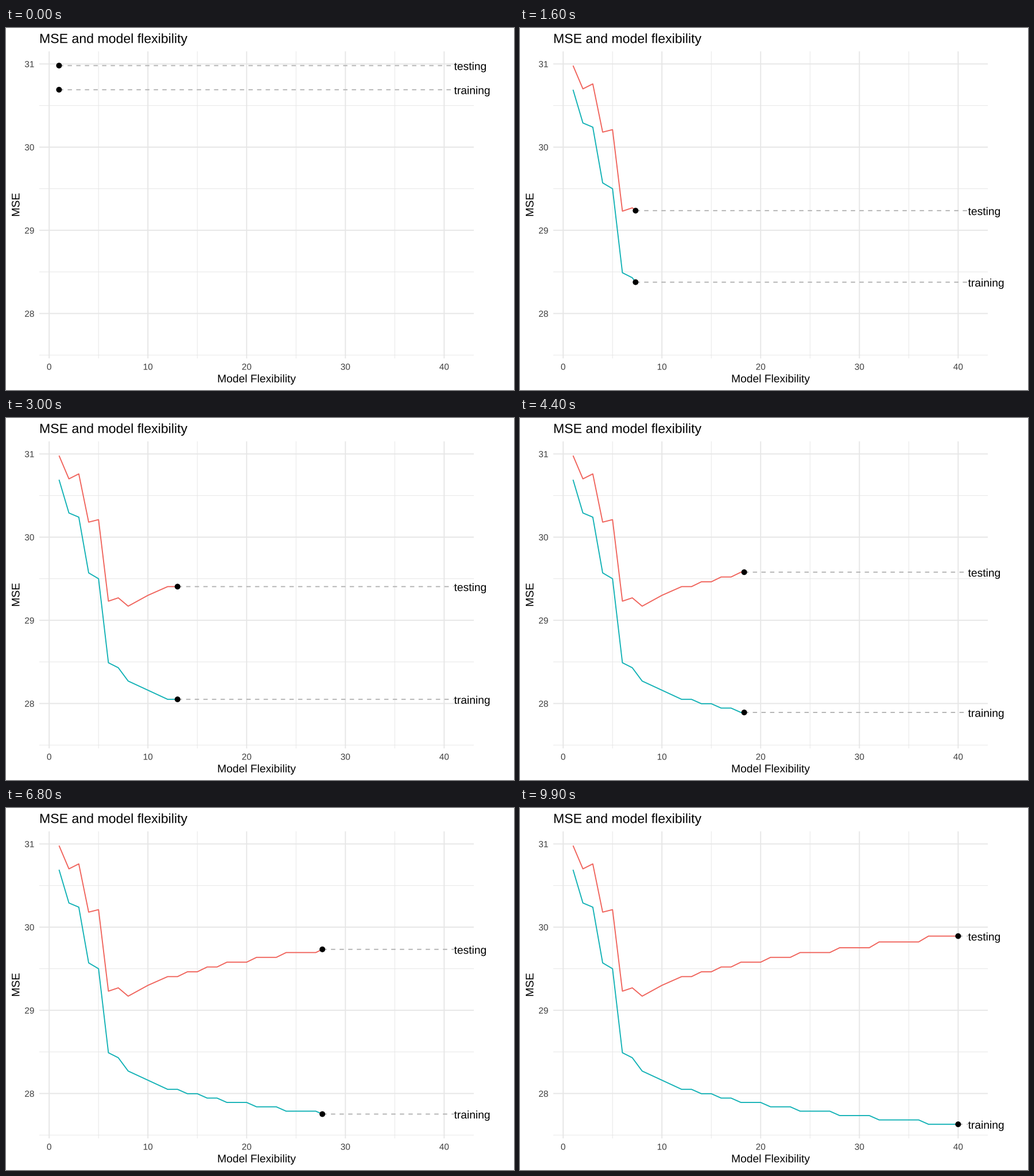
Recreate the animation shown at these times as a matplotlib script. Size 885 by 632 pixels, loop 10000 ms.

```python
import numpy as np
import matplotlib.pyplot as plt
from matplotlib.animation import FuncAnimation
from matplotlib.patches import Circle, PathPatch
from matplotlib.textpath import TextPath
from matplotlib.transforms import Affine2D

W, H, DPI = 885, 632, 100
FRAMES, INTERVAL = 100, 100
PX = 72 / DPI  # points per pixel

plt.rcParams["font.family"] = "Liberation Sans"

LEFT, RIGHT, TOP, BOTTOM = 58, 815, 40.8, 576.8
THICK, THIN = 1.87, 0.95
GRID, TICK, DASH = "#e6e6e6", "#404040", "#b2b2b2"
TITLE, LABEL, SMALL = 23.1, 19.25, 15.4
LABEL_X = 41

# MSE at a few model levels, linear in between
KEYS = [1, 2, 3, 4, 5, 6, 7, 8, 10, 12, 18, 20]
TESTING = [30.98, 30.70, 30.76, 30.18, 30.21, 29.23, 29.27, 29.17,
           29.30, 29.405, 29.752, 29.892]
TRAINING = [30.69, 30.29, 30.24, 29.57, 29.50, 28.49, 28.43, 28.27,
            28.16, 28.05, 27.735, 27.63]

# one level per unit at first, then each level lasts 15% longer
flex = np.arange(1, 41)
starts = np.append(np.arange(1, 12), np.round(12 * 1.15 ** np.arange(9)))
levels = np.searchsorted(starts, flex, side="right")
# each data point is reached on a whole frame
key_frames = np.round((flex - 1) * (FRAMES - 1) / 39)


def sx(v):
    return 75.2 + 17.203 * np.asarray(v)


def sy(v):
    return 62.7 + 145.25 * (31 - np.asarray(v))


fig = plt.figure(figsize=(W / DPI, H / DPI), dpi=DPI, facecolor="white")
ax = fig.add_axes([0, 0, 1, 1])
ax.set_xlim(0, W)
ax.set_ylim(H, 0)
ax.axis("off")


def line(xs, ys, color, width, z, **kw):
    return ax.plot(xs, ys, color=color, lw=width * PX, zorder=z, snap=False,
                   solid_capstyle="butt", dash_capstyle="butt",
                   solid_joinstyle="round", **kw)[0]


def advance(s, size):
    def right(t):
        return TextPath((0, 0), t, size=size).get_extents().x1
    return right(s + "0") - right("0")


class Label:
    """Outline text placed at fractional pixels."""

    def __init__(self, x, y, s, size, color="black", align=0, angle=0):
        self.shape = (Affine2D().translate(-align * advance(s, size), 0)
                      .scale(1, -1).rotate_deg(-angle))
        self.x = x
        self.patch = ax.add_patch(
            PathPatch(TextPath((0, 0), s, size=size), fc=color, lw=0,
                      zorder=6, snap=False, clip_on=False))
        self.move(y)

    def move(self, y):
        place = self.shape + Affine2D().translate(self.x, y)
        self.patch.set_transform(place + ax.transData)


def draw_panel():
    for v in range(0, 41, 5):
        major = v % 10 == 0
        line([sx(v)] * 2, [TOP, BOTTOM], GRID, THICK if major else THIN, 1)
        if major:
            Label(sx(v), 596.7, str(v), SMALL, TICK, 0.5)
    for v in np.arange(27.5, 31.1, 0.5):
        major = v % 1 == 0
        line([LEFT, RIGHT], [sy(v)] * 2, GRID, THICK if major else THIN, 1)
        if major:
            Label(49.4, sy(v) + 5.7, f"{v:.0f}", SMALL, TICK, 1)
    mid_x, mid_y = (LEFT + RIGHT) / 2, (TOP + BOTTOM) / 2
    Label(LEFT, 26.2, "MSE and model flexibility", TITLE)
    Label(mid_x, 618.6, "Model Flexibility", LABEL, align=0.5)
    Label(23.4, mid_y, "MSE", LABEL, align=0.5, angle=90)


class Series:
    def __init__(self, name, mse, color):
        self.mse = np.interp(levels, KEYS, mse)
        self.curve = line([], [], color, THICK, 2)
        on = 7.5 / THICK
        self.lead = line([], [], DASH, THICK, 3, linestyle=(0, (on, on)))
        self.dot = ax.add_patch(Circle((0, 0), 5, fc="black", lw=0,
                                       zorder=4, snap=False))
        self.label = Label(sx(LABEL_X), 0, name, LABEL)

    def reveal(self, x):
        y = np.interp(x, flex, self.mse)
        past = flex < x
        self.curve.set_data(sx(np.append(flex[past], x)),
                            sy(np.append(self.mse[past], y)))
        self.lead.set_data(sx([x, LABEL_X]), sy([y, y]))
        self.dot.center = sx(x), sy(y)
        self.label.move(sy(y) + 7.7)
        return self.curve, self.lead, self.dot, self.label.patch


draw_panel()
series = [Series("testing", TESTING, "#f0625a"),
          Series("training", TRAINING, "#10b1b5")]


def update(i):
    x = np.interp(i, key_frames, flex)
    return [artist for s in series for artist in s.reveal(x)]


anim = FuncAnimation(fig, update, frames=FRAMES, interval=INTERVAL,
                     repeat=True, repeat_delay=0, blit=False)
plt.show()
```
